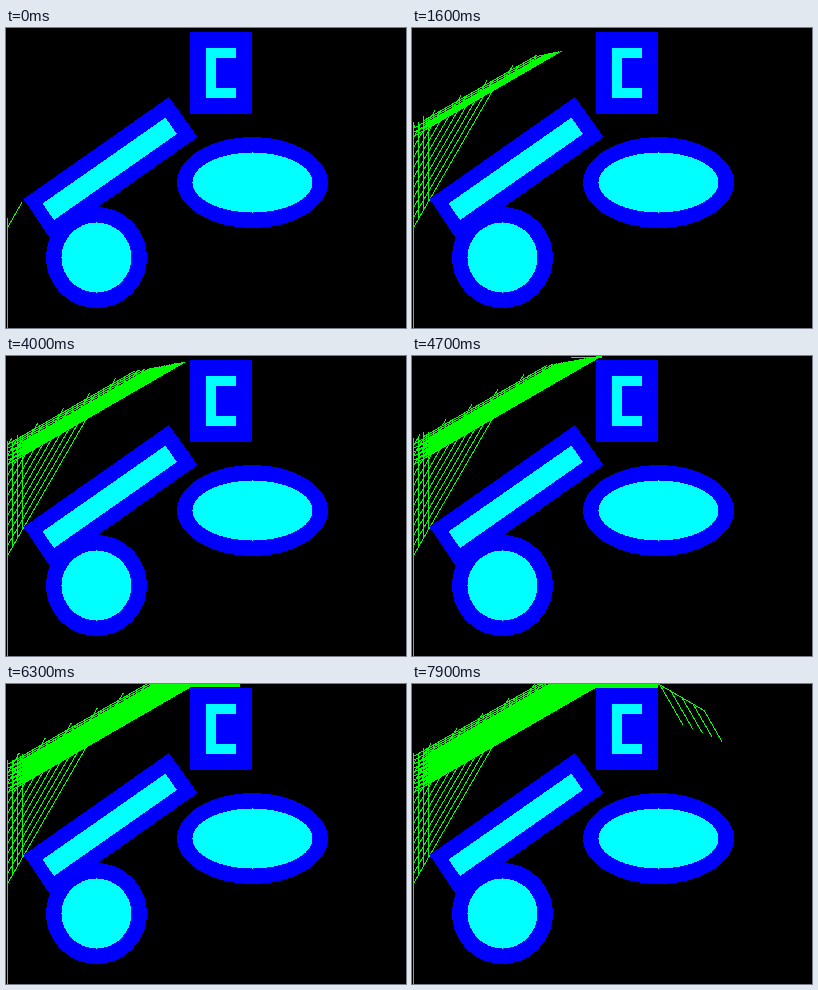
Recreate the animation shown at these times as an HTML page. Size 400 by 300 pixels, loop 8000 ms.

```html
<!DOCTYPE html>
<html lang="en">
<head>
<meta charset="utf-8">
<title>Path search</title>
<style>
  html, body { margin: 0; width: 100%; height: 100%; overflow: hidden; background: #000; }
  svg { display: block; width: 400px; height: 300px; shape-rendering: crispEdges; }
</style>
</head>
<body>
<svg viewBox="0 0 400 300">
  <path id="tree" fill="none" stroke="#0f0" transform="translate(1.5 -.5)"/>
  <g fill="#00f">
    <path d="M17.5 171L163 69L191.5 109L45 212Z"/>
    <circle cx="90.5" cy="229.5" r="50.4"/>
    <ellipse cx="246.5" cy="154.5" rx="75.4" ry="45.4"/>
    <path d="M184 4H246V86H184Z"/>
  </g>
  <g fill="#0ff">
    <path d="M36.5 175.6L159.4 89.6L170.9 106L48 192Z"/>
    <circle cx="90.5" cy="229.5" r="35.01"/>
    <ellipse cx="246.5" cy="154.5" rx="60.01" ry="30.01"/>
    <path d="M200 20H230V30H210V60H230V70H200Z"/>
  </g>
</svg>
<script>
const LOOP = 8, STEP = 0.1;
const SHALLOW = 1 / Math.sqrt(3), STEEP = Math.sqrt(3);
const LOW = 109;          // intercept of the band's lower edge
const GAP = STEEP - SHALLOW;
const TAPER = 2.5;        // how much sooner higher branches end
const tree = document.getElementById('tree');

// How far right the search has reached: [seconds, x]
const REACH = [[0, 15], [0.3, 75], [0.9, 125], [1.6, 148], [2.7, 166],
  [3.6, 174], [4.5, 182], [5.4, 212], [6.3, 232], [7.2, 273], [7.9, 310]];

function reachAt(t) {
  const i = Math.max(1, REACH.findIndex(p => p[0] >= t));
  const [t0, x0] = REACH[i - 1], [t1, x1] = REACH[i];
  return x0 + (x1 - x0) * (t - t0) / (t1 - t0);
}

function treeAt(t) {
  let d = '';
  const line = (x1, y1, x2, y2) => {
    d += `M${x1.toFixed(2)} ${y1.toFixed(2)}L${x2.toFixed(2)} ${y2.toFixed(2)}`;
  };
  const reach = reachAt(t);
  const top = 101 - 3.95 * t;
  const newest = 200 - 10 * Math.floor(t / 0.09 + 0.01);

  // Upright branches on the left
  line(0, 301, 0, Math.max(top, newest - 10));
  for (let j = 1; j < 4; j++) {
    const x = 5 * j, low = 200 - 8.66 * j;
    const high = Math.max(top - SHALLOW * x + j % 2 * 3, newest - 8.66 * j);
    if (high < low) line(x, low, x, high);
  }

  // Branches at 60 degrees, ending in a ragged crest
  for (let y0 = 320; y0 >= 80; y0 -= 10) {
    if (y0 < newest) continue;
    const crest = top + (y0 / 10 % 3) * 4;
    const start = y0 > 200 ? (y0 - LOW) / GAP : 0;
    const end = Math.min((y0 - crest) / GAP, reach,
      (reach - TAPER * (LOW - y0)) / (1 + TAPER * GAP));
    if (end > start) line(start, y0 - STEEP * start, end, y0 - STEEP * end);
  }

  // Branches at 30 degrees
  for (let i = 0; i < 40; i++) {
    const b = LOW - i;
    const birth = Math.max(0, (101 - b) / 3.95 + 0.8) + (i % 2 ? 1.5 : 0);
    if (t < birth) continue;
    const start = Math.max(i * 7 % 4 * 5, (newest - b) / GAP);
    const end = Math.min(reach - TAPER * i, b / SHALLOW);
    if (end > start) line(start, b - SHALLOW * start, end, b - SHALLOW * end);
  }

  // Level branches along the top edge
  [[2, 4.4], [1, 5.2], [3, 6], [4, 6.8]].forEach(([y, birth]) => {
    const start = Math.max(top / SHALLOW + 15, 120);
    if (t >= birth) line(start, y, Math.min(reach, 244), y);
  });

  // Descent past the upper obstacle
  const fan = n => [246.5 + 11 * n, 1.5 + 11 * SHALLOW * n];
  for (let n = 0; n < 5; n++) {
    if (t < 6.85 + 0.2 * n) break;
    const [x, y] = fan(n), len = 46 - 2.5 * n;
    line(...(n ? fan(n - 1) : [243, 1]), x, y);
    line(x, y, x + len / 2, y + len * STEEP / 2);
  }
  return d;
}

let shown = -1;
function frame(now) {
  const step = Math.floor(now / 1000 % LOOP / STEP);
  if (step !== shown) {
    shown = step;
    tree.setAttribute('d', treeAt(step * STEP));
  }
  requestAnimationFrame(frame);
}
frame(performance.now());
</script>
</body>
</html>
```
